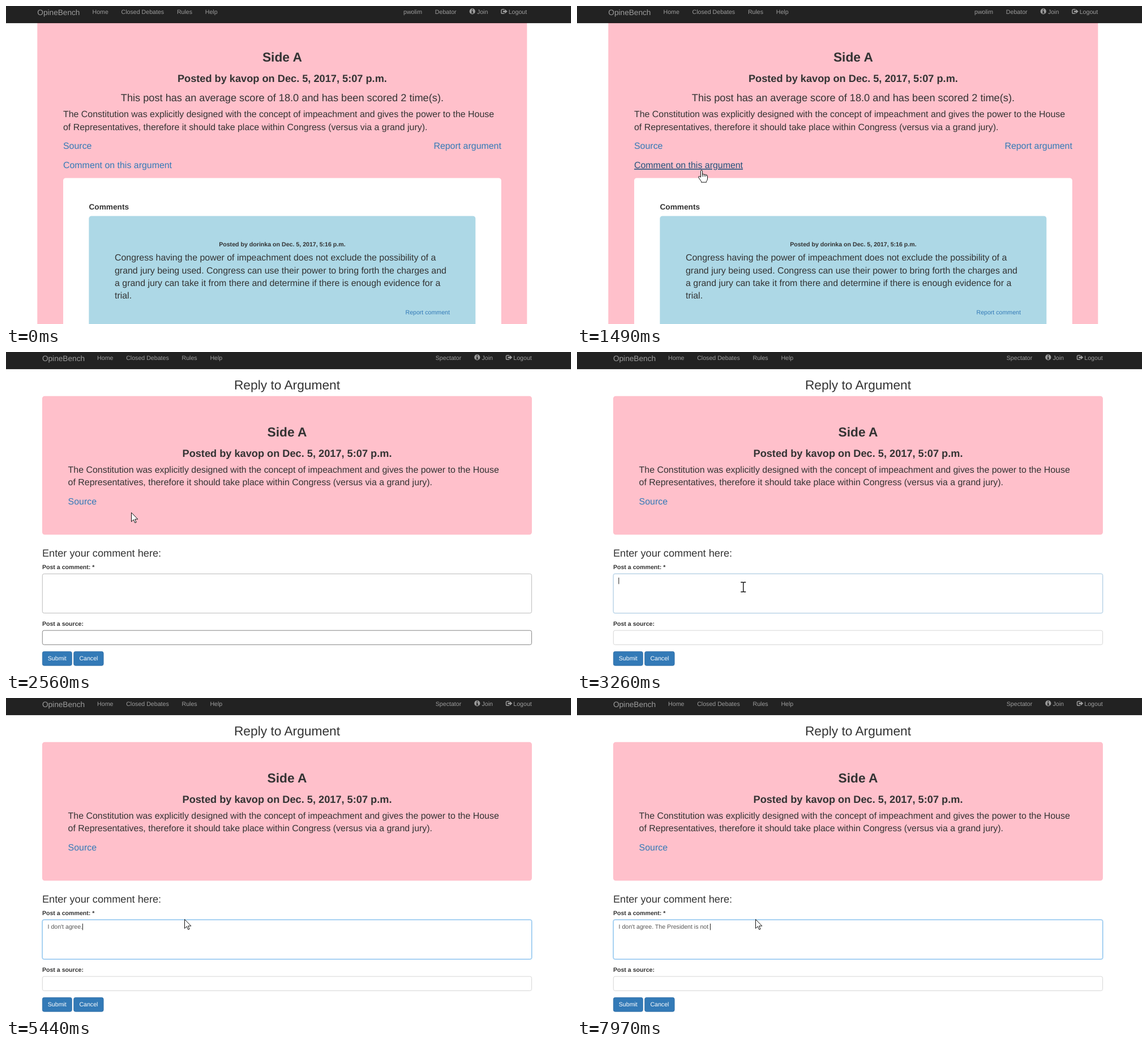
Recreate the animation shown at these times as an HTML page. Size 998 px wide and 561 px high, loop 8000 ms.

```html
<!DOCTYPE html>
<html lang="en">
<head>
<meta charset="utf-8">
<title>Debate reply</title>
<style>
  html, body { margin: 0; width: 100%; height: 100%; overflow: hidden; background: #fff; }
  svg { display: block; width: 100%; height: 100%; }
  text { font-family: "Liberation Sans", Arial, sans-serif; font-size: 10.62px; fill: #333;
         white-space: pre; text-rendering: geometricPrecision; }
  .h2 { font-size: 22.76px; }
  .h3 { font-size: 18.21px; }
  .h4 { font-size: 13.66px; }
  .p { font-size: 15.93px; }
  .b { font-weight: bold; }
  .mid { text-anchor: middle; }
  .end { text-anchor: end; }
  text.link { fill: #337ab7; }
  text.hover { fill: #23527c; text-decoration: underline; }
  #nav text { fill: #9d9d9d; }
  .btn rect { fill: #337ab7; stroke: #2e6da4; stroke-width: .8; }
  .btn text { fill: #fff; text-anchor: middle; }
  .field { fill: #fff; stroke-width: .8; }
</style>
</head>
<body>
<svg viewBox="0 0 998 561" preserveAspectRatio="none">
  <rect width="998" height="561" fill="#fff"/>

  <g id="thread">
    <rect x="55.3" y="0" width="865" height="570" fill="#ffc0cb"/>
    <text class="h2 b mid" x="487.9" y="98.2">Side A</text>
    <text class="h3 b mid" x="487.9" y="133.9">Posted by kavop on Dec. 5, 2017, 5:07 p.m.</text>
    <text class="h3 mid" x="487.9" y="168.4">This post has an average score of 18.0 and has been scored 2 time(s).</text>
    <text class="p" x="101" y="196.2">The Constitution was explicitly designed with the concept of impeachment and gives the power to the House</text>
    <text class="p" x="101" y="218.6">of Representatives, therefore it should take place within Congress (versus via a grand jury).</text>
    <text class="p link" x="101" y="252.2">Source</text>
    <text class="p link end" x="874.9" y="252.2">Report argument</text>
    <text class="p link" id="comment" x="101" y="286">Comment on this argument</text>
    <rect x="101" y="303.4" width="773.8" height="300" rx="4.5" fill="#fff"/>
    <text class="h4 b" x="146.5" y="359.3">Comments</text>
    <rect x="146.4" y="370.4" width="682.9" height="300" rx="4.5" fill="#add8e6"/>
    <text class="b mid" x="487.9" y="423.5">Posted by dorinka on Dec. 5, 2017, 5:16 p.m.</text>
    <text class="p" x="192" y="449.2">Congress having the power of impeachment does not exclude the possibility of a</text>
    <text class="p" x="192" y="471.6">grand jury being used. Congress can use their power to bring forth the charges and</text>
    <text class="p" x="192" y="493.9">a grand jury can take it from there and determine if there is enough evidence for a</text>
    <text class="p" x="192" y="516.2">trial.</text>
    <text class="link end" x="783.9" y="544.2">Report comment</text>
  </g>

  <g id="reply" transform="translate(8.6)">
    <text class="h2 mid" x="487.9" y="65.5">Reply to Argument</text>
    <rect x="55.3" y="77.8" width="865" height="244.4" rx="4.5" fill="#ffc0cb"/>
    <text class="h2 b mid" x="487.9" y="149.4">Side A</text>
    <text class="h3 b mid" x="487.9" y="184.8">Posted by kavop on Dec. 5, 2017, 5:07 p.m.</text>
    <text class="p" x="101" y="212.5">The Constitution was explicitly designed with the concept of impeachment and gives the power to the House</text>
    <text class="p" x="101" y="234.9">of Representatives, therefore it should take place within Congress (versus via a grand jury).</text>
    <text class="p link" x="101" y="268.5">Source</text>
    <text class="h3" x="55.3" y="360.6">Enter your comment here:</text>
    <text class="b" x="55.3" y="383">Post a comment: *</text>
    <rect id="glow" x="55.7" y="391.4" width="864.2" height="69.2" rx="3" fill="none" stroke="#66afe9" stroke-width="3"/>
    <rect class="field" id="area" x="55.7" y="391.4" width="864.2" height="69.2" rx="3"/>
    <text id="typed" x="64.9" y="407.3" style="fill:#555"></text>
    <rect id="caret" y="398" width="1" height="11.4" fill="#222"/>
    <text class="b" x="55.3" y="482.8">Post a source:</text>
    <rect class="field" id="source" x="55.7" y="491.2" width="864.2" height="25.2" rx="3"/>
    <g class="btn">
      <rect x="55.7" y="528.4" width="52" height="24.8" rx="3"/>
      <text x="81.7" y="544.4">Submit</text>
      <rect x="111.1" y="528.4" width="52.4" height="24.8" rx="3"/>
      <text x="137.3" y="544.4">Cancel</text>
    </g>
  </g>

  <rect width="998" height="30.2" fill="#080808"/>
  <rect width="998" height="29.3" fill="#222"/>
  <g id="nav">
    <text class="h4" x="55.3" y="15.5">OpineBench</text>
    <text x="152.5" y="14">Home</text>
    <text x="203.6" y="14">Closed Debates</text>
    <text x="301.9" y="14">Rules</text>
    <text x="351.8" y="14">Help</text>
    <text class="end" id="user" x="735" y="14">pwolim</text>
    <text class="end" id="role" x="795.6" y="14"></text>
    <circle cx="823.7" cy="9.4" r="5.1" fill="#9d9d9d"/>
    <path d="M822.8 5.5h1.9v1.6h-1.9zM822 8.2h2.7v3.6h.9v1.2h-3.7v-1.2h.9v-2.4h-.8z" fill="#222"/>
    <text x="831.9" y="14">Join</text>
    <path d="M880.4 5.9h-3.6a1.9 1.9 0 0 0-1.9 1.9v3.6a1.9 1.9 0 0 0 1.9 1.9h3.6" fill="none" stroke="#9d9d9d" stroke-width="1.5"/>
    <path d="M877.9 8.3h3.4v-2.5l4.4 3.8-4.4 3.8v-2.5h-3.4z" fill="#9d9d9d"/>
    <text x="887.7" y="14">Logout</text>
  </g>

  <g id="cursor">
    <path id="arrow" d="M.5.5v16l3.7-3.5 2.6 5.6 2.3-1-2.5-5.4h5.2z" fill="#fff" stroke="#111" stroke-width="1"/>
    <path id="hand" d="M-1.5 12.5V1.8a1.5 1.5 0 0 1 3 0V7.500q1.500-1.300 3 .4q1.700-1 3 .6q2.700-.6 3 2v5q-.2 2.500-2 4.500v1.500H-.5v-1.500L-5 13.500q-1-2.500 1.200-2.700z M1.500 7.500v4M4.500 7.900v3.600M7.500 8.500v3" fill="#fff" stroke="#111" stroke-width="1"/>
    <path id="beam" d="M-4.500-8.500h3.500l1 .9 1-.9h3.500M-4.500 8.500h3.500l1-.9 1 .9h3.500M0-7.600V7.600" fill="none" stroke="#111" stroke-width="1.400"/>
  </g>
</svg>
<script>
const LOOP = 8000, ENTER = 460, HOVER = 1150, PRESS = 2430, OPEN = 2560, FOCUS = 3210;

// Mouse path: time, x, y
const path = [
  [460, 774, 548], [600, 620, 490], [780, 390, 384], [950, 242, 312],
  [1100, 223, 293], [1230, 220.5, 290], [1350, 219.5, 290], [1490, 220, 289.5],
  [2430, 220, 289.5], [2510, 221, 282.5], [2600, 221, 283], [2800, 238, 312],
  [3000, 273, 378], [3200, 293.5, 415], [3260, 293.5, 415], [3340, 315, 390]
];

// Typing bursts: first key, last key, characters
const bursts = [
  [3580, 3580, "I"], [3780, 4080, " don"], [4280, 4380, "'t"], [4520, 4710, " ag"],
  [4870, 5110, "ree"], [5440, 5440, "."], [5590, 5900, " The "], [6130, 6130, "P"],
  [6310, 6310, "r"], [6710, 6840, "esi"], [6980, 7540, "dent is "], [7680, 7680, "n"],
  [7830, 7970, "ot "]
];

const $ = id => document.getElementById(id);
const show = (id, on) => $(id).style.display = on ? "" : "none";
const ramp = (t, a, b) => Math.min(1, Math.max(0, (t - a) / (b - a)));
const mix = (a, b, k) => a + (b - a) * k;
const rgb = (a, b, k) => `rgb(${a.map((v, i) => Math.round(mix(v, b[i], k)))})`;
const grey = v => [v, v, v];

function mouse(t) {
  const i = path.findIndex(p => p[0] > t);
  if (i < 0) return path[path.length - 1].slice(1);
  if (i === 0) return path[0].slice(1);
  const a = path[i - 1], b = path[i], k = ramp(t, a[0], b[0]);
  return [mix(a[1], b[1], k), mix(a[2], b[2], k)];
}

function typedAt(t) {
  let out = "";
  for (const [from, to, keys] of bursts) {
    if (t < from) break;
    const gap = (to - from) / Math.max(1, keys.length - 1);
    out += gap ? keys.slice(0, Math.floor((t - from) / gap + 1.001)) : keys;
  }
  return out;
}

function drawForm(t) {
  const focus = ramp(t, FOCUS, 3320);
  const idle = mix(170, 204, ramp(t, OPEN, 2620));
  $("area").setAttribute("stroke", rgb(grey(idle), [102, 175, 233], focus));
  $("source").setAttribute("stroke", rgb(grey(102), grey(204), ramp(t, OPEN, 2660)));
  $("glow").setAttribute("opacity", 0.3 * focus);

  const text = typedAt(t), box = $("typed");
  if (box.textContent !== text) box.textContent = text;
  const width = text ? box.getComputedTextLength() : 0;
  $("caret").setAttribute("x", 64.7 + width);
  show("caret", t >= FOCUS);
}

function drawCursor(t, replying) {
  const [x, y] = mouse(t);
  const hand = t >= HOVER && t < PRESS, beam = replying && y > 391;
  $("cursor").setAttribute("transform", `translate(${x} ${y})`);
  show("cursor", t >= ENTER);
  show("hand", hand);
  show("beam", beam);
  show("arrow", !hand && !beam);
}

function draw(t) {
  const replying = t >= OPEN;
  show("thread", !replying);
  show("reply", replying);
  show("user", !replying);
  $("role").textContent = replying ? "Spectator" : "Debator";
  $("nav").setAttribute("transform", `translate(${replying ? 8.6 : 0})`);
  $("comment").classList.toggle("hover", t >= HOVER);
  if (replying) drawForm(t);
  drawCursor(t, replying);
}

const start = performance.now();
function tick() {
  draw((performance.now() - start) % LOOP);
  requestAnimationFrame(tick);
}
tick();
</script>
</body>
</html>
```
